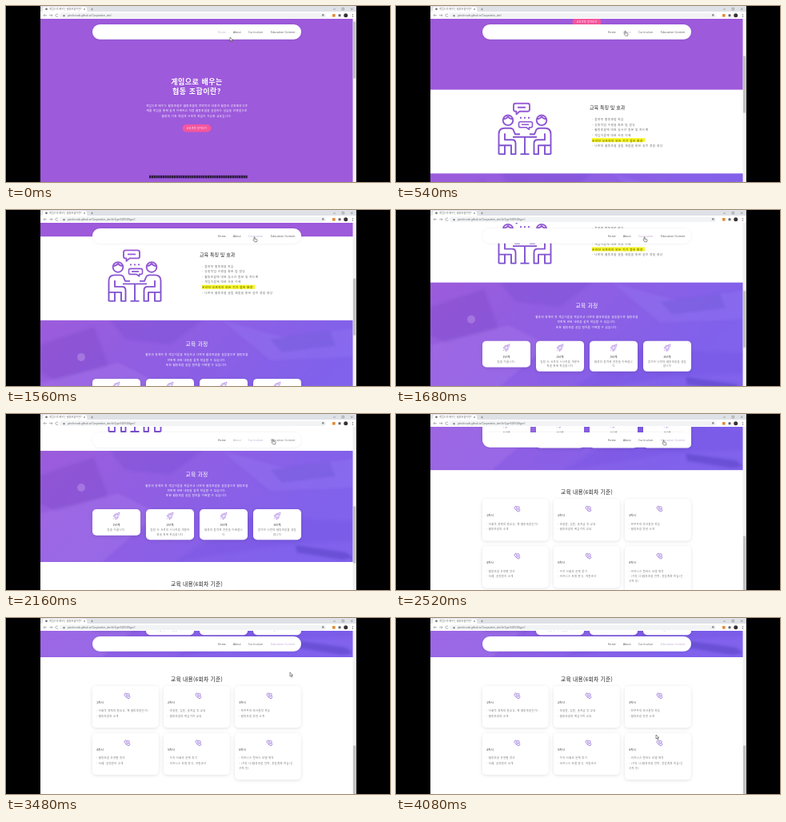
These frames come from a looping animation (480 px wide and 220 px high, 4140 ms). An HTML page:

```html
<!DOCTYPE html>
<html lang="ko">
<head>
<meta charset="utf-8">
<title>협동조합 교육</title>
<style>
html, body { margin: 0; width: 100%; height: 100%; overflow: hidden; background: #000; }
svg { display: block; width: 480px; height: 220px; }
text { font-family: 'Noto Sans CJK KR', 'Noto Sans KR', 'Noto Sans CJK', 'Noto Sans', sans-serif; }
.screen { filter: blur(.4px); }
.mid { text-anchor: middle; }
.h1 { font-size: 9px; font-weight: 700; letter-spacing: .5px; fill: #fff; }
.h2 { font-size: 6.8px; font-weight: 500; letter-spacing: .2px; }
.lead { font-size: 3.5px; font-weight: 500; letter-spacing: .35px; fill: #fff; }
.list { font-size: 3.6px; letter-spacing: .45px; fill: #6b6b6b; }
.small { font-size: 3.3px; letter-spacing: .35px; fill: #777; }
.step { font-size: 3.8px; font-weight: 500; fill: #444; }
.ui { font-family: Roboto, 'Noto Sans CJK KR', sans-serif; font-size: 3.15px; fill: #6a6d72; }
.menu text { font-family: 'Open Sans', 'Noto Sans', sans-serif; font-size: 3.2px; letter-spacing: .18px; fill: #444; }

.page, .thumb, .cursor, .hash, .arrow, .hand, .strip, .menu text { animation: 4140ms linear infinite; }
.page { animation-name: scroll; }
.thumb { animation-name: thumb; }
.cursor { animation-name: cursor; }
.menu text, .hash, .arrow, .hand, .strip { animation-timing-function: step-end; }
.hash { animation-name: hash; }
.arrow { animation-name: arrow; }
.hand { animation-name: hand; }
.strip { animation-name: strip; }
.menu .home { animation-name: home; }
.menu .about { animation-name: about; }
.menu .course { animation-name: course; }
.menu .content { animation-name: content; }

@keyframes scroll {
  0%, 7.32% { transform: translateY(0); animation-timing-function: cubic-bezier(.37, 0, .63, 1); }
  16.5%, 35.58% { transform: translateY(-191px); animation-timing-function: cubic-bezier(.37, 0, .63, 1); }
  44.76%, 54.11% { transform: translateY(-296px); animation-timing-function: cubic-bezier(.37, 0, .63, 1); }
  63.29%, 100% { transform: translateY(-432px); }
}
@keyframes thumb {
  0%, 7.32% { transform: translateY(0); animation-timing-function: cubic-bezier(.37, 0, .63, 1); }
  16.5%, 35.58% { transform: translateY(62px); animation-timing-function: cubic-bezier(.37, 0, .63, 1); }
  44.76%, 54.11% { transform: translateY(96px); animation-timing-function: cubic-bezier(.37, 0, .63, 1); }
  63.29%, 100% { transform: translateY(140px); }
}
@keyframes cursor {
  0% { transform: translate(280px, 39px); }
  6%, 17% { transform: translate(286px, 31.5px); }
  26.1% { transform: translate(303px, 33.5px); }
  32%, 43% { transform: translate(310px, 34px); }
  51%, 60% { transform: translate(333px, 32px); }
  67%, 79% { transform: translate(340px, 41px); }
  91.3% { transform: translate(376px, 106px); }
  98.5%, 100% { transform: translate(325px, 146px); }
}
@keyframes hash { 0% { opacity: 0; } 16.5%, 100% { opacity: 1; } }
@keyframes arrow { 0% { opacity: 1; } 5% { opacity: 0; } 18% { opacity: 1; } 28% { opacity: 0; } 63%, 100% { opacity: 1; } }
@keyframes hand { 0% { opacity: 0; } 5% { opacity: 1; } 18% { opacity: 0; } 28% { opacity: 1; } 63%, 100% { opacity: 0; } }
@keyframes strip { 0% { opacity: 1; } 2.9%, 100% { opacity: 0; } }
@keyframes home { 0% { fill: #b9a9c4; } 8% { fill: #444; } 19% { fill: #aaa; } 32%, 100% { fill: #444; } }
@keyframes about { 0% { fill: #444; } 5% { fill: #b9a4c8; } 32% { fill: #444; } 45% { fill: #aaa; } 56%, 100% { fill: #444; } }
@keyframes course { 0% { fill: #555; } 30% { fill: #b79ccd; } 56%, 100% { fill: #555; } }
@keyframes content { 0% { fill: #444; } 47% { fill: #666; } 56%, 100% { fill: #b5a0cd; } }
</style>
</head>
<body>
<svg viewBox="0 0 480 220" xmlns="http://www.w3.org/2000/svg">
  <defs>
    <clipPath id="view"><rect x="43" y="16" width="391" height="208"/></clipPath>
    <clipPath id="band"><rect x="43" y="342" width="391" height="139"/></clipPath>
    <linearGradient id="violet" x2="1" y2=".35">
      <stop offset="0" stop-color="#9c5cdc"/><stop offset="1" stop-color="#8062ec"/>
    </linearGradient>
    <linearGradient id="ink" gradientUnits="userSpaceOnUse" x1="140" y1="121" x2="150" y2="187">
      <stop offset="0" stop-color="#9a5bd6"/><stop offset="1" stop-color="#7a50cc"/>
    </linearGradient>
    <filter id="soft"><feGaussianBlur stdDeviation="1.5"/></filter>
    <filter id="shade" x="-20%" y="-20%" width="140%" height="150%">
      <feDropShadow dx="0" dy="1" stdDeviation="2" flood-color="#000" flood-opacity=".12"/>
    </filter>
    <filter id="glow" x="-5%" y="-30%" width="110%" height="160%">
      <feDropShadow dx="0" dy=".3" stdDeviation=".8" flood-color="#000" flood-opacity=".1"/>
    </filter>
    <g id="person">
      <circle cx="140" cy="142.500" r="6.300"/>
      <path d="M134 141q4 0 6-3q2 3 6 3"/>
      <path d="M128.500 185V160q0-7.500 7-7.500h7q4 0 5 4l1.500 3.500h6"/>
      <path d="M136 159v8h9q4.500 0 4.500 4.500v13.500h-5.500v-11h-8"/>
      <path d="M128.500 185h7.500v-11h-7"/>
    </g>
    <g id="rocket" fill="#f1eaff" stroke="#a47be2" stroke-width=".6" stroke-linejoin="round">
      <path d="M-2 1q1-4 6-5q0 5-5 7zM-2 1l-2 0l2-3h2M-1 3v2l3-2v-2M-2.500 2.500l-1.500 2"/>
      <circle cx="1.500" cy="-1.500" r=".7"/>
    </g>
    <g id="badge" fill="#ece3fb" stroke="#8c65cf" stroke-width=".6">
      <path d="M-3.500-2l2-1.500l5 5l-1 2l-2 0l-4-4z"/>
      <circle cx="1" cy="-1" r="1.800"/><path d="M-2 1l2 2"/>
    </g>
  </defs>

  <g class="screen">
    <rect x="43" y="-4" width="394.600" height="228" fill="#fff"/>

    <g clip-path="url(#view)">
      <g class="page">
        <rect x="43" y="12" width="391" height="225.300" fill="#9d5adb"/>
        <g class="mid">
          <text class="h1" x="238.500" y="98">게임으로 배우는</text>
          <text class="h1" x="238.500" y="110">협동 조합이란?</text>
          <text class="lead" x="238.500" y="125.500">게임으로 배우는 협동조합은 협동조합의 전반적인 내용과 협동의 공동체의식과</text>
          <text class="lead" x="238.500" y="132">재를 게임을 통해 쉽게 이해하고 직접 협동조합을 설립하는 실습을 진행함으로</text>
          <text class="lead" x="238.500" y="138.500">협동의 기초 개념과 구조적 학습이 가능한 교육입니다.</text>
          <rect x="220.500" y="148" width="36" height="9.500" rx="4.700" fill="#f4569d"/>
          <text class="lead" x="238.500" y="154" style="font-size:3px">교육과정 알아보기</text>
        </g>

        <g transform="translate(0 133)" fill="none" stroke="url(#ink)" stroke-width="1.900" stroke-linejoin="round">
          <use href="#person"/>
          <use href="#person" transform="matrix(-1 0 0 1 322 0)"/>
          <path d="M146 163.500H176M161 164V184.500M155.500 185H166.500"/>
          <path d="M149.500 121.500h15q2.500 0 2.500 2.500v5q0 2.500-2.500 2.500h-10l-4 3.500v-3.500h-1q-2.500 0-2.500-2.500v-5q0-2.500 2.500-2.500zM152 126.500h10"/>
          <path d="M155 139.500h2M160 139.500h2M165 139.500h2"/>
          <path d="M155.500 144.500h13q2 0 2 2v3q0 2-2 2h-2v2.500l-3.500-2.500h-7.500q-2 0-2-2v-3q0-2 2-2zM157 148h9" stroke-width="1.600"/>
        </g>
        <text class="h2" x="242" y="261.800" fill="#222" style="font-size:6.100px;letter-spacing:0">교육 특징 및 효과</text>
        <rect x="245" y="297.800" width="66" height="5" fill="#f6f522"/>
        <g id="features"></g>

        <g clip-path="url(#band)">
          <rect x="43" y="342" width="391" height="139" fill="url(#violet)"/>
          <g filter="url(#soft)">
            <path d="M43 372L110 350L128 400L62 418L43 408z" fill="#6a3db4" opacity=".2"/>
            <path d="M43 420L140 395L190 420L120 481H43z" fill="#b98af0" opacity=".24"/>
            <path d="M130 342H245L205 372L150 366z" fill="#5d3fc0" opacity=".18"/>
            <path d="M270 342L350 364L434 352V388L330 392z" fill="#a18bff" opacity=".2"/>
            <path d="M330 366L405 356L412 374L345 382z" fill="#4f3fb9" opacity=".18"/>
            <path d="M362 460L425 469L434 476L420 478L364 469z" fill="#4f3bba" opacity=".45"/>
            <path d="M210 481L300 425L434 430V455L340 460z" fill="#6248d6" opacity=".16"/>
          </g>
          <circle cx="94" cy="388" r="5" fill="#b58be6" opacity=".6"/>
        </g>
        <g class="mid">
          <text class="h2" x="238.500" y="373.700" fill="#fff">교육 과정</text>
          <text class="lead" x="238.500" y="386.500">협동의 경제와 첫 게임이론을 학습하고 나만의 협동조합을 설립함으로 협동조합</text>
          <text class="lead" x="238.500" y="392.800">전반에 관한 내용을 쉽게 학습할 수 있습니다.</text>
          <text class="lead" x="238.500" y="399">또한 협동조합 설립 절차를 이해할 수 있습니다.</text>
        </g>
        <g id="steps" class="mid"></g>

        <text class="h2 mid" x="238.500" y="510.500" fill="#222">교육 내용(6회차 기준)</text>
        <g id="lessons"></g>
      </g>

      <rect x="108" y="23" width="261" height="18.700" rx="9.300" fill="#fff" filter="url(#glow)"/>
      <g class="menu">
        <text class="home" x="265" y="33.500">Home</text>
        <text class="about" x="284" y="33.500">About</text>
        <text class="course" x="303" y="33.500">Curriculum</text>
        <text class="content" x="331" y="33.500">Education Content</text>
      </g>
    </g>

    <rect x="433.500" y="16" width="4.100" height="208" fill="#f1f1f1"/>
    <rect class="thumb" x="433.900" y="19.500" width="3.400" height="71" fill="#c1c1c1"/>

    <rect x="43" y="-4" width="394.600" height="11" fill="#dee1e6"/>
    <path d="M44 7q2 0 2-2v-2q0-2 2-2h51q2 0 2 2v2q0 2 2 2z" fill="#fff"/>
    <rect x="43" y="7" width="394.600" height="9" fill="#fff"/>
    <circle cx="50.500" cy="3.800" r="1.400" fill="#777"/>
    <text class="ui" x="54" y="5">게임으로 배우는 협동조합이란?</text>
    <rect x="67" y="8.500" width="333" height="6.500" rx="3.200" fill="#f1f3f4"/>
    <g fill="none" stroke="#808080" stroke-width=".6">
      <path d="M97 3l2 2m0-2l-2 2M106 4h3m-1.500-1.500v3M409 4h3M420 2.500h2.500v2.500h-2.500zM431 2.500l2.500 2.500m0-2.500l-2.500 2.500"/>
      <path d="M51 11.700h-4m1.500-1.500l-1.500 1.500l1.500 1.500M54 11.700h4m-1.500-1.500l1.500 1.500l-1.500 1.500M65 10.800a1.700 1.700 0 1 0 .2 1.500"/>
      <path d="M395 12.500l1.200-2.500l1.200 2.500l-2.400-1.500h2.400z"/>
    </g>
    <rect x="71.500" y="11.200" width="2" height="2" fill="#777"/>
    <text class="ui" x="77" y="12.900">pinelo-code.github.io/Cooperative_site/<tspan class="hash">#cType%20%20type1</tspan></text>
    <rect x="408" y="10" width="3.600" height="3.600" fill="#e28b35"/>
    <rect x="415.500" y="10.300" width="3" height="3" rx=".6" fill="#666"/>
    <circle cx="424.700" cy="11.800" r="2.500" fill="#3a2f33"/>
    <path d="M433.500 10v4" stroke="#666" stroke-width=".9" stroke-dasharray=".9 .6"/>

    <path class="strip" d="M179 213.500H302" stroke="#2b1b3b" stroke-width="3.400" stroke-dasharray="2.300 .5"/>

    <g class="cursor" stroke="#333" stroke-width=".55" fill="#fff" stroke-linejoin="round">
      <path class="arrow" d="M0 0v5l1.200-1l.9 1.900l.9-.4l-.9-1.900h1.600z"/>
      <path class="hand" d="M0 0q.7-.6 1.100 0v2.200l2.400.5q.6.200.5.900l-.5 2.200h-2.600l-1.800-2.200q.2-.7.900-.2z"/>
    </g>
  </g>
</svg>
<script>
const fill = (id, markup) => { document.getElementById(id).innerHTML = markup; };
const line = (cls, x, y, str, extra = '') => `<text class="${cls}" x="${x}" y="${y}" ${extra}>${str}</text>`;
const card = (x, y, w, h) =>
  `<rect x="${x}" y="${y}" width="${w}" height="${h}" rx="5" fill="#fff" filter="url(#shade)"/>`;
const icon = (name, x, y) => `<use href="#${name}" transform="translate(${x} ${y})"/>`;

const features = [
  '- 참여형 활동체험 학습',
  '- 공동작업 수행을 통한 팀 빌딩',
  '- 협동조합에 대한 실시간 질문 및 피드백',
  '- 게임이론에 대한 사용 이해',
  '온라인·오프라인 모든 기기 접속 환경',
  '- 나만의 협동조합 설립 체험을 통한 실전 경험 향상'
];
fill('features', features.map((str, i) => line('list', 245, 275.8 + i * 6.6, str,
  i === 4 ? 'style="fill:#554d10"' : '')).join(''));

const steps = [
  ['팀을 이룹니다.'],
  ['팀원 서 서로의 시너지를 개발하', '통을 통해 학습합니다'],
  ['협동의 원칙에 연관을 이해합니', '다'],
  ['참가자 나만의 협동조합을 설립', '합니다']
];
fill('steps', steps.map((rows, i) => {
  const x = 108 + i * 67, mid = x + 30;
  return card(x, 415, 60, 27.4 + rows.length * 5.4) + icon('rocket', mid, 423) +
    line('step', mid, 436, `${i + 1}단계`) +
    rows.map((str, k) => line('small', mid, 442.3 + k * 5.3, str)).join('');
}).join(''));

const lessons = [
  ['- 사회적 경제의 필요성, 왜 협동조합인가?', '- 협동조합의 소개'],
  ['- 조합원, 임원, 출자금 등 교육', '- 협동조합의 핵심가치 교육'],
  ['- 민주주의 의사결정 학습', '- 협동조합 정관 소개'],
  ['- 협동조합 유형별 정리', '- 사례, 설정원리 소개'],
  ['- 우리 사회의 문제 찾기', '- 비즈니스 모델 분석, 자원조사'],
  ['- 비즈니스 캔버스 모델 제작', '- (가칭 나)협동조합 전략, 창업계획 학습(신', '규자 등)']
];
fill('lessons', lessons.map((rows, i) => {
  const x = 108 + (i % 3) * 89, low = i > 2, y = low ? 576 : 517;
  return card(x, y, 82.5, (low ? 39.4 : 39.6) + rows.length * 6.2) + icon('badge', x + 43.5, y + 12) +
    line('step', x + 5, y + 22, `${i + 1}차시`) +
    rows.map((str, k) => line('small', x + 5, y + 32.3 + k * 6.2, str)).join('');
}).join(''));
</script>
</body>
</html>
```
